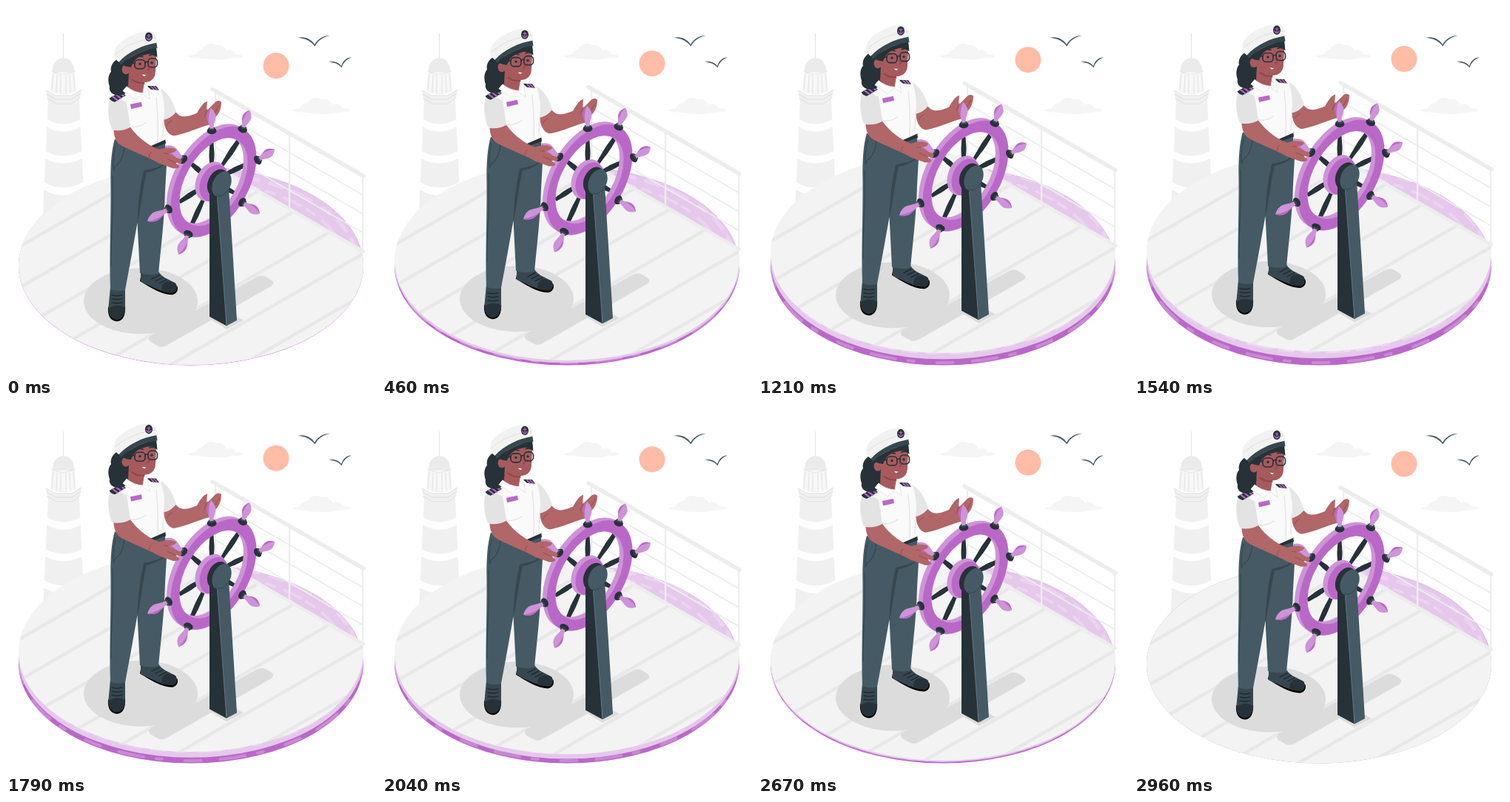
Write an HTML page that moves like this. It is 500 px wide and 500 px high and loops after 3000 ms.

```html
<!DOCTYPE html>
<html lang="en">
<head>
<meta charset="utf-8">
<title>At the helm</title>
<style>
html, body { margin: 0; width: 100%; height: 100%; overflow: hidden; background: #fff; }
svg { display: block; width: 100%; height: 100%; }
.line { fill: none; stroke-linecap: round; stroke-linejoin: round; }
</style>
</head>
<body>
<svg viewBox="0 0 500 500">
  <defs>
    <ellipse id="oval" cx="250" cy="351" rx="233" ry="134.6"/>
    <clipPath id="seaClip"><use href="#oval"/></clipPath>
    <clipPath id="deckClip"><use href="#oval" data-rise="2"/></clipPath>
    <clipPath id="edgeClip"><path d="M0 0H278V214L500 341.500V520H0Z"/></clipPath>
  </defs>

  <!-- lighthouse -->
  <g>
    <path d="M77.500 37V70" stroke="#e6e6e6" stroke-width="1.200"/>
    <path d="M57 126L49 300H107L99 126Z" fill="#f0f0f0"/>
    <path d="M55.500 153Q78 166 100.500 153L101 163Q78 177 55 163ZM53 196Q78 209 102.500 196L103 206Q78 219 52.500 206ZM51 238Q78 253 104.500 238L105 248Q78 264 50.500 248Z" fill="#fff"/>
    <path d="M62.500 90C63 76 69 71 77.500 70C86 71 92 76 92.500 90Z" fill="#ebebeb"/>
    <path d="M62 88Q77.500 96 93 88L95 115Q78 124 60 115Z" fill="#f7f7f7"/>
    <path class="line" d="M62 88Q77.500 96 93 88M64 91L62 114M69 93L68 117M74 93V118M81 93V118M86 93L87 117M91 91L93 114" stroke="#e4e4e4" stroke-width="1.200"/>
    <path d="M54 114L67 121H89L102 113L100 124L89 132H68L56 125Z" fill="#f0f0f0"/>
    <path class="line" d="M54 114L67 121H89L102 113M55 119L67 126H89L101 118M56 125L68 132H89L100 124" stroke="#e0e0e0"/>
  </g>

  <!-- clouds, birds, sun -->
  <path d="M246 69C249 65 254 67 257 64C259 58 265 60 268 55C274 48 282 52 285 53C292 52 297 56 299 61C305 57 309 62 310 66C315 64 319 66 320 69C310 71 306 69 300 71C290 74 284 72 276 72C267 70 256 71 246 69Z" fill="#f5f5f5"/>
  <path d="M387 142C390 138 395 140 398 137C400 131 407 133 410 128C416 121 424 125 427 126C434 124 440 129 441 134C448 130 453 134 454 138C459 137 464 139 465 142C456 144 450 143 444 145C432 147 424 145 416 146C407 143 396 144 387 142Z" fill="#f5f5f5"/>
  <path d="M394 43C403 40.500 412 44 417 52C422 43.500 430 39.500 438 40C429 41.500 422 46 417.500 54.500C411 46.500 404 43.500 394 43ZM437 75.500C444 74 450 77 453 81C456 73 461 69 467 69.500C460 72 456 76 453.500 83.500C449 78 444 76.500 437 75.500Z" fill="#455a64"/>
  <circle data-rise="1" cx="365" cy="81" r="17.500" fill="#ffbca7"/>

  <!-- sea -->
  <use href="#oval" fill="#ba68c8"/>
  <g clip-path="url(#seaClip)">
    <ellipse class="line" cx="250" cy="351" rx="231" ry="131" stroke="#fff" stroke-opacity=".22" stroke-width="4" stroke-dasharray="22 31 8 17 34 26"/>
    <g data-rise="1">
      <use href="#oval" fill="#e5c8eb"/>
      <ellipse class="line" cx="250" cy="351" rx="226" ry="126" stroke="#fff" stroke-opacity=".22" stroke-width="5" stroke-dasharray="18 12 30 20 10 16"/>
      <ellipse class="line" cx="250" cy="356" rx="212" ry="120" stroke="#fff" stroke-opacity=".22" stroke-width="4" stroke-dasharray="12 14 24 10"/>
    </g>
  </g>

  <!-- deck -->
  <g clip-path="url(#deckClip)">
    <g data-rise="1" clip-path="url(#edgeClip)">
      <path d="M0 100H500V500H0Z" fill="#f3f3f3"/>
      <g id="planks" stroke="#e8e8e8" stroke-width="4.500"></g>
    </g>
  </g>

  <g data-rise="1">
    <!-- railing -->
    <g id="rail" class="line" stroke="#ededed"></g>

    <!-- shadows -->
    <ellipse cx="182" cy="399" rx="77" ry="44.500" fill="#dcdcdc"/>
    <path d="M195 446L338 367Q346 362 353 367L359 371Q364 375 358 379L217 459Q210 463 204 459L195 454Q191 450 195 446Z" fill="#dcdcdc"/>
    <path d="M270 420L298 437L321 425L294 410Z" fill="#dcdcdc"/>

    <!-- shoes and trousers -->
    <path d="M181 372C194 380 211 391 225 390.500C231 389 233 384 231.500 379L182 366Z" fill="#000"/>
    <path d="M182 358L206 359C211 368 222 370 229 375C232 379 231 386 226 387.500C214 389 198 380 182 373Z" fill="#37474f"/>
    <path d="M211 378C214 371 222 371 229 375C232 379 231 386 226 387.500C220 388 215 386 210 384Z" fill="#263238"/>
    <path class="line" d="M197 369L207 364M202 372L212 367M207 375L217 370" stroke="#1c272c" stroke-width="1.300"/>
    <path d="M138 407C137 420 142 426 150 426.500C158 426 162 418 161 405Z" fill="#000"/>
    <path d="M141 380L161 382V406C161 418 156 424 149 424C142 423 138 417 138.500 407Z" fill="#37474f"/>
    <path d="M139 409C145 404 155 404 161 408C161 418 156 424 149 424C142 423 138 417 139 409Z" fill="#263238"/>
    <path class="line" d="M143 391Q150 393 157 391M143 396Q150 398 157 396M143 401Q150 403 157 401" stroke="#1c272c" stroke-width="1.300"/>
    <path d="M147 180C142.500 195 141 215 141.500 242C142 290 139.500 340 141 383Q151 387 161 384C166 358 172 325 177.500 293L181 361Q193 365 206 362C209 330 214 290 215 250L217 215L215 184L190 194C172 190 160 186 147 180Z" fill="#455a64"/>
    <path d="M186 223L200 219.500Q212 217 217 207V211Q210 221 190 225.500C185 245 183 270 177.500 295C178 270 181 245 186 223Z" fill="#37474f"/>
    <path class="line" d="M148 189C143 215 145 230 147 217Q158 211 160 190M144 230C146 280 141 320 142 350" stroke="#37474f" stroke-width="1.200"/>

    <!-- far arm -->
    <path d="M213 151C213 164 219 176 228 175.500C245 172 262 164 274 161L281 152C288 147 291 139 291 130C288 127 284 128 281 132L271 142L272 129C266 131 262 138 258 145C246 150 236 153 229 143Z" fill="#b16668"/>
    <path class="line" d="M272 140L268 150M288 135L282 145M224 155Q219 157 217 162" stroke="#9a4a4d"/>

    <!-- shirt -->
    <path d="M190 189L215 179L216 186L191 195Z" fill="#263238"/>
    <path d="M162 111C150 117 143 122 141 128L149 173C163 183 178 190 192 191L215 181L213 154Q223 152 230 143C226 130 218 115 205 109L188 106C180 111 170 112 162 111Z" fill="#fafafa"/>
    <path d="M213 154Q223 152 230 143C226 130 219 117 209 112Q216 132 213 154Z" fill="#e6e6e6"/>
    <path d="M143 121C136 132 137 152 143 167C152 171 162 168 168 163L163 131Z" fill="#e3e3e3"/>
    <path class="line" d="M168 163Q177 166 189 158M203 124Q206 152 205 184M168 164C170 175 176 184 185 189M213 154L212 176" stroke="#e3e3e3" stroke-width="1.200"/>
    <path d="M139.500 125L155 116L162 121L147 130Q142 129 139.500 125Z" fill="#263238"/>
    <path class="line" d="M144.500 123L150.500 127.500M149 120.500L155 125M153.500 118L159.500 122" stroke="#ba68c8" stroke-width="2.200"/>
    <path d="M190 108L203 108.500L207 114L196 113Z" fill="#263238"/>
    <path class="line" d="M196 109L200 113M200 109L204 113" stroke="#ba68c8" stroke-width="1.600"/>
    <path d="M168 133L183 130L184 136L169 139.500Z" fill="#ba68c8"/>

    <!-- head -->
    <path d="M158 68C150 71 140 78 142 89C137 95 138 103 140 109C138 119 150 124 160 119C167 116 168 107 166 98L174 72Z" fill="#263238"/>
    <path d="M166 90L165 109C170 118 182 121 188 116L187 100Z" fill="#a65a5d"/>
    <path d="M168 99Q176 107 187 105L187 102Z" fill="#914649"/>
    <path d="M163 109L158 115L175 127L184 119L194 126L191 108L187 106L185 118Q172 117 163 109Z" fill="#fff" stroke="#e6e6e6"/>
    <ellipse cx="162" cy="86" rx="5.500" ry="6.500" fill="#a65a5d"/>
    <path d="M165 72L166 90C168 99 177 104 187 103.500C197 103 202 97 202 88L203.500 62L172 62Z" fill="#a65a5d"/>
    <path d="M155 79C168 68 188 59 203 55L204.500 70C201 65 194 64 187 66.500C176 69 172 75 169 83L163 82Z" fill="#263238"/>
    <g class="line" stroke="#263238" stroke-width="1.600">
      <rect x="174" y="73" width="14" height="12" rx="4.500"/>
      <rect x="192" y="71" width="12.500" height="12" rx="4.500"/>
      <path d="M188 77Q190 75 192 76M174 77L165 79.500M176 69.500Q180 67 185 69M194 67Q198 65 202 67"/>
    </g>
    <circle cx="181" cy="78.500" r="1.700" fill="#263238"/>
    <circle cx="197" cy="77" r="1.700" fill="#263238"/>
    <path class="line" d="M191 81Q196 85 191 87" stroke="#8a3f43" stroke-width="1.200"/>
    <path d="M183 91.500Q187 94 189.500 92Q189 96 186.500 95.500Q184 94.500 183 91.500Z" fill="#fff" stroke="#8a3f43" stroke-width=".7"/>
    <path d="M152 75C164 61 186 53 203 48L204.500 57C186 59 168 67 155.500 80Z" fill="#37474f"/>
    <path d="M146 65C147 54 156 47 168 41C178 36 190 32 199 35.500C203 39 204 44 203 50C185 53 165 62 152.500 76C148 73 146 69 146 65Z" fill="#f2f2f2"/>
    <path class="line" d="M149 65C162 53 182 45 203 43" stroke="#e0e0e0"/>
    <ellipse cx="193" cy="42" rx="5" ry="6.200" fill="#263238"/>
    <path class="line" d="M193 38.500V45.500M191 40.500H195M190 43Q191 46 193 46T196 43" stroke="#ba68c8" stroke-width="1.100"/>

    <!-- wheel -->
    <g id="spokes" fill="#263238"></g>
    <g id="rim" fill="none"></g>
    <g id="handles"></g>
    <ellipse cx="277" cy="237.500" rx="20" ry="28" transform="rotate(24 277 237.500)" fill="#ce93d8"/>
    <ellipse cx="281" cy="239.500" rx="18" ry="26" transform="rotate(24 281 239.500)" fill="#ba68c8"/>
    <path d="M275 247L287 246L298 432.500L275 420Z" fill="#263238"/>
    <path d="M285 254L301 246L312 425L298 432.500Z" fill="#455a64"/>
    <path d="M285.500 259L298 432" stroke="#78909c" stroke-width=".6"/>
    <ellipse cx="286" cy="239" rx="13" ry="19" transform="rotate(24 286 239)" fill="#263238"/>
    <ellipse cx="291.500" cy="241" rx="12" ry="18" transform="rotate(24 291.500 241)" fill="#455a64"/>
    <path class="line" d="M285 256Q293 261 301 247" stroke="#37474f"/>

    <!-- near arm -->
    <path d="M145.500 168C146 179 150 186 158 190C175 198 195 206 207 213L221 218C227 221 234 220 234.500 217L229 212L235 213C239 212 238 208 235 207L220 200C224 198 229 199 230 194C222 190 214 192 207 194C195 190 180 180 168 164Q157 170 145.500 168Z" fill="#b16668"/>
    <path class="line" d="M220 200L214 199M229 212L218 207M196 198Q193 201 193 205" stroke="#9a4a4d"/>
  </g>
</svg>
<script>
const LOOP = 3000, RISE = 10, PHASE = 40;
const byId = id => document.getElementById(id);
const line = (x1, y1, x2, y2, w) =>
  `<path d="M${x1} ${y1}L${x2} ${y2}"${w ? ` stroke-width="${w}"` : ''}/>`;

// Planks run parallel to the 30 degree axis.
const slope = 0.577;
byId('planks').innerHTML = [0, 1, 2, 3, 4, 5, 6].map(i => {
  const y = 336 + i * 55.5;
  return line(0, y, 500, y - 500 * slope);
}).join('');

byId('rail').innerHTML =
  [25.5, 51, 76.5].map(d => line(283, 115 + d, 482, 230 + d, 1.8)).join('') +
  [[283, 115], [383, 173], [482, 230]].map(([x, y]) => line(x, y, x, y + 102, 2.4)).join('') +
  line(283, 217, 483, 332, 4.5) + line(279, 113, 483, 230, 5.5);

// Outer grip tip, then collar, then the outer end of each spoke.
const grips = [
  [277, 138, 278, 168, 278, 187],
  [329, 141, 320, 166, 317, 178],
  [363, 194, 341, 208, 325, 214],
  [343, 281, 320, 266, 307, 252],
  [233, 336, 246, 309, 250, 298],
  [191, 291, 219, 275, 236, 264],
  [216, 189, 239, 207, 251, 214]
];

// Places a part at one point with its x axis aimed at another.
const aim = (x, y, tx, ty, part) =>
  `<g transform="translate(${x} ${y}) rotate(${Math.atan2(ty - y, tx - x) * 180 / Math.PI})">${part(Math.hypot(tx - x, ty - y))}</g>`;

byId('spokes').innerHTML = grips.map(([, , , , x, y]) => aim(278, 237, x, y, n =>
  `<path d="M0 -2C${n * .5} -2 ${n * .55} -3.700 ${n * .75} -3.500L${n + 2} -2.500V2.500L${n * .75} 3.500C${n * .55} 3.700 ${n * .5} 2 0 2Z"/>`)).join('');

const ring = (x, y, color) =>
  `<circle r="73.5" transform="translate(${x} ${y}) rotate(-60) scale(1 .577)" stroke="${color}" stroke-width="17"/>`;
byId('rim').innerHTML = [0, 1, 2, 3, 4]
  .map(i => ring(275 + i, 234.5 + i * .6, '#ce93d8')).join('') + ring(280.5, 238, '#ba68c8');

byId('handles').innerHTML = grips.map(([tx, ty, bx, by]) => aim(bx, by, tx, ty, n => {
  const side = `M2 -2.500C${n * .35} -3 ${n * .4} -6 ${n * .65} -6Q${n * .85} -5 ${n} 0`;
  return `<ellipse cx="-1" rx="4.500" ry="6.500" fill="#263238"/>
    <ellipse cx="2" rx="2.500" ry="4.500" fill="#37474f"/>
    <path d="${side}Q${n * .85} 5 ${n * .65} 6C${n * .4} 6 ${n * .35} 3 2 2.500Z" fill="#ce93d8"/>
    <path d="${side}Q${n * .6} -6 2 -2.500Z" fill="#ba68c8"/>`;
})).join('');

const movers = [...document.querySelectorAll('[data-rise]')]
  .map(el => [el, Number(el.dataset.rise)]);

function draw() {
  const p = ((performance.now() + PHASE) % LOOP) / LOOP;
  const lift = RISE * (1 - Math.abs(1 - 2 * p));
  for (const [el, k] of movers) el.setAttribute('transform', `translate(0 ${-k * lift})`);
  requestAnimationFrame(draw);
}
draw();
</script>
</body>
</html>
```
